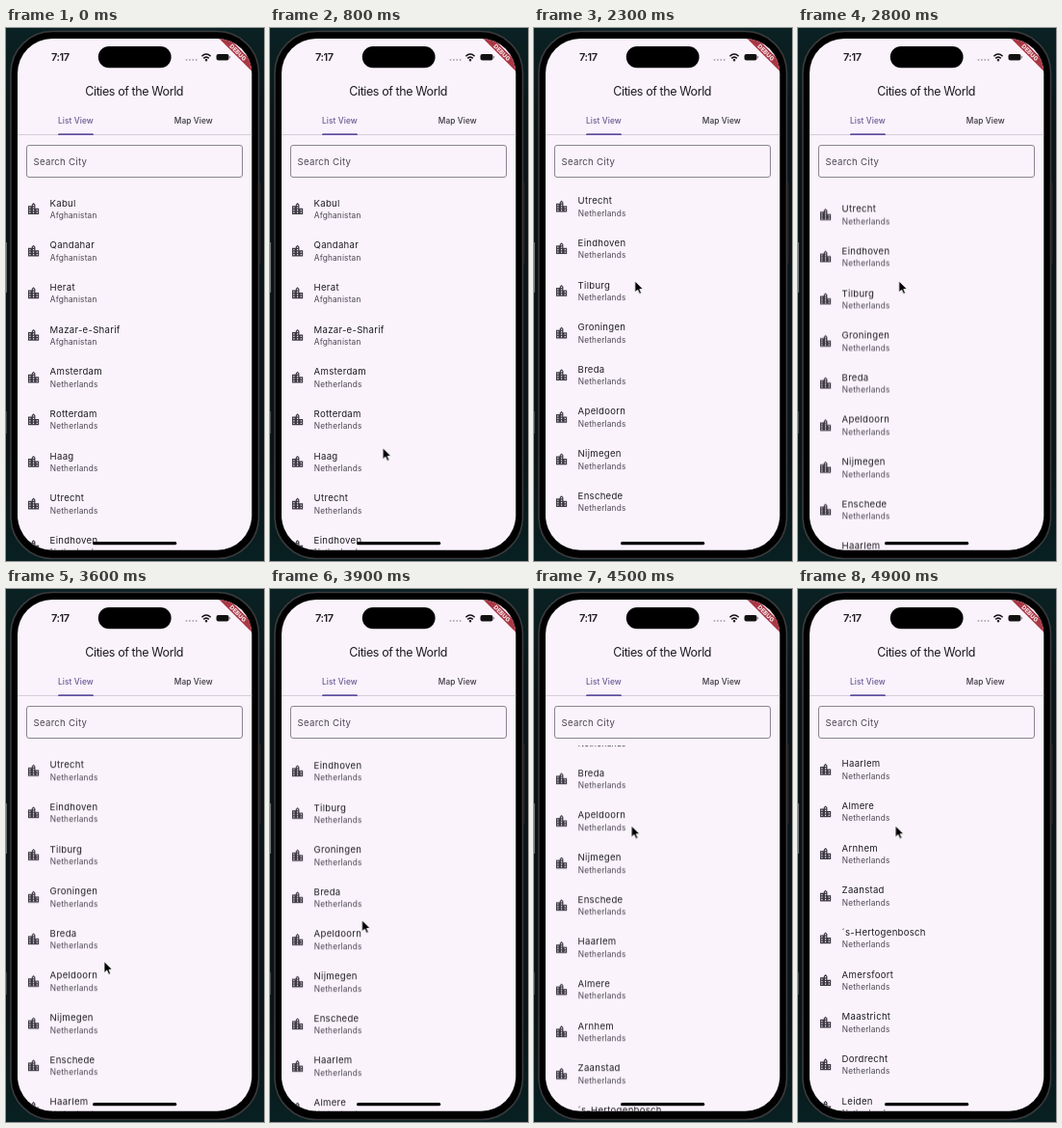
An HTML page that plays this animation: 268x552 px, repeating every 5000 ms.

```html
<!DOCTYPE html>
<html lang="en">
<head>
<meta charset="utf-8">
<title>Cities of the World</title>
<style>
html, body { margin: 0; width: 100%; height: 100%; overflow: hidden; background: #06181a; }
svg { display: block; width: 268px; height: 552px; }
text { font-family: Inter, sans-serif; fill: #1d1b20; }
.title { font-size: 12.5px; letter-spacing: -.4px; }
.tab { font-size: 8.3px; font-weight: 500; letter-spacing: .1px; fill: #37343d; }
.active { fill: #655a90; }
.city { font-size: 9.6px; letter-spacing: .27px; }
.country { font-size: 8.3px; letter-spacing: .17px; fill: #49454f; }
.time { font-size: 11px; font-weight: 600; letter-spacing: -.5px; }
.debug { font-size: 6.2px; font-weight: 800; fill: #f6e4e8; }

#list { animation: scroll 5s linear infinite; }
#more { animation: load 5s step-end infinite; }
#cursor { animation: move 5s linear infinite, show 5s step-end infinite; }

/* first fling overshoots the end of the list, more rows load, then a second fling */
@keyframes scroll {
  0%, 34% { transform: translateY(0); }
  36% { transform: translateY(-70px); }
  38% { transform: translateY(-164px); }
  40% { transform: translateY(-285px); }
  42% { transform: translateY(-322px); }
  44% { transform: translateY(-316px); }
  46% { transform: translateY(-308px); }
  48% { transform: translateY(-303.5px); }
  52%, 70% { transform: translateY(-299.5px); }
  74% { transform: translateY(-310px); }
  78% { transform: translateY(-347.7px); }
  80% { transform: translateY(-358px); }
  84% { transform: translateY(-380px); }
  86% { transform: translateY(-394px); }
  88% { transform: translateY(-418px); }
  90% { transform: translateY(-470px); }
  92% { transform: translateY(-545px); }
  94% { transform: translateY(-597px); }
  96% { transform: translateY(-632px); }
  98%, 100% { transform: translateY(-655px); }
}
@keyframes move {
  0%, 10% { transform: translate(155px, 461px); }
  18%, 34% { transform: translate(104.8px, 426.2px); }
  36% { transform: translate(104.8px, 356px); }
  38%, 57% { transform: translate(104.8px, 262px); }
  64%, 70% { transform: translate(103px, 391px); }
  74% { transform: translate(101px, 380.5px); }
  78% { transform: translate(95.5px, 343px); }
  84% { transform: translate(98px, 310.5px); }
  86% { transform: translate(99px, 296.5px); }
  88% { transform: translate(100px, 272.5px); }
  89%, 100% { transform: translate(101.2px, 245.2px); }
}
@keyframes show { 0% { opacity: 0; } 10%, 100% { opacity: 1; } }
@keyframes load { 0% { opacity: 0; } 55%, 100% { opacity: 1; } }
</style>
</head>
<body>
<svg viewBox="0 0 268 552">
  <defs>
    <clipPath id="screen"><rect x="12" y="11" width="243.3" height="529.7" rx="36"/></clipPath>
    <clipPath id="view"><rect x="11" y="162.5" width="245" height="380"/></clipPath>
    <linearGradient id="desk" x1="0" y1="0" x2="0" y2="1">
      <stop offset="0" stop-color="#0a2123"/>
      <stop offset=".2" stop-color="#0b1416"/>
      <stop offset=".8" stop-color="#0b1416"/>
      <stop offset="1" stop-color="#082022"/>
    </linearGradient>
    <path id="icon" transform="translate(21.1 179.8) scale(.623)" fill="#3d3943" d="M15 11V5l-3-3-3 3v2H3v14h18V11h-6zm-8 8H5v-2h2v2zm0-4H5v-2h2v2zm0-4H5V9h2v2zm6 8h-2v-2h2v2zm0-4h-2v-2h2v2zm0-4h-2V9h2v2zm0-4h-2V5h2v2zm6 12h-2v-2h2v2zm0-4h-2v-2h2v2z"/>
  </defs>

  <rect width="268" height="552" fill="url(#desk)"/>
  <rect y="222" width="1" height="52" fill="#6a7072"/>
  <rect y="397" width="1" height="23" fill="#3c4244"/>
  <rect x="263" y="160" width="2" height="84" rx="1" fill="#1c1c1e"/>
  <rect x="5" y="3.5" width="257.5" height="546" rx="43" fill="#000" stroke="#3a3a3d" stroke-width="1.6"/>

  <g clip-path="url(#screen)">
    <rect x="11" y="10" width="246" height="532" fill="#faf3fc"/>

    <text class="time" x="47" y="34">7:17</text>
    <rect x="95.8" y="18.9" width="75.8" height="22.4" rx="11.2"/>
    <path d="M187.5 33h12" stroke="#aaa5ac" stroke-width="1.8" stroke-linecap="round" stroke-dasharray="0 3.4"/>
    <g fill="none" stroke="#111" stroke-width="1.5">
      <path d="M203.4 29.2q4.6-4.4 9.2 0M205.2 31.4q2.8-2.6 5.6 0"/>
      <circle cx="208" cy="33.2" r=".5"/>
    </g>
    <rect x="218.5" y="27" width="13" height="6.4" rx="2" fill="#111"/>
    <rect x="232.2" y="29" width="1" height="2.4" rx=".5" fill="#8a858c"/>

    <text class="title" x="82.3" y="70">Cities of the World</text>
    <text class="tab active" x="54" y="99.2">List View</text>
    <text class="tab" x="174.8" y="99.2">Map View</text>
    <rect x="11" y="110.2" width="246" height=".8" fill="#cbc5d0"/>
    <path d="M54 111v-.4q0-1.4 1.4-1.4h34.2q1.4 0 1.4 1.4v.4z" fill="#6050a0"/>

    <rect x="21.5" y="121.5" width="224" height="33" rx="2.5" fill="none" stroke="#8a858f" stroke-width="1"/>
    <text class="city" x="28.6" y="141.8" style="fill:#49454f">Search City</text>

    <g clip-path="url(#view)">
      <g id="list"><g id="more"></g></g>
    </g>

    <rect x="90" y="532.1" width="87.3" height="3.2" rx="1.6"/>
    <g transform="translate(255.5 10.7) rotate(45)">
      <rect x="-27" y="16.9" width="54" height="7.4" fill="#a93845"/>
      <text class="debug" y="22.8" text-anchor="middle">DEBUG</text>
    </g>
  </g>

  <path id="cursor" d="M0 0V11.8L2.8 9.2 4.7 13.4 6.7 12.6 4.9 8.5H8.6z" fill="#000" stroke="#fff" stroke-width=".8"/>
</svg>
<script>
const PITCH = 43.65, PAGE = 15, AFGHAN = 4;
const cities = ('Kabul,Qandahar,Herat,Mazar-e-Sharif,Amsterdam,Rotterdam,Haag,Utrecht,Eindhoven,' +
  'Tilburg,Groningen,Breda,Apeldoorn,Nijmegen,Enschede,Haarlem,Almere,Arnhem,Zaanstad,' +
  '´s-Hertogenbosch,Amersfoort,Maastricht,Dordrecht,Leiden').split(',');

const row = (city, i) => `<g transform="translate(0 ${i * PITCH})">
  <use href="#icon"/>
  <text class="city" x="45.6" y="184.7">${city}</text>
  <text class="country" x="45.8" y="197.1">${i < AFGHAN ? 'Afghanistan' : 'Netherlands'}</text>
</g>`;

const rows = cities.map(row);
document.getElementById('list').insertAdjacentHTML('afterbegin', rows.slice(0, PAGE).join(''));
document.getElementById('more').innerHTML = rows.slice(PAGE).join('');
</script>
</body>
</html>
```
